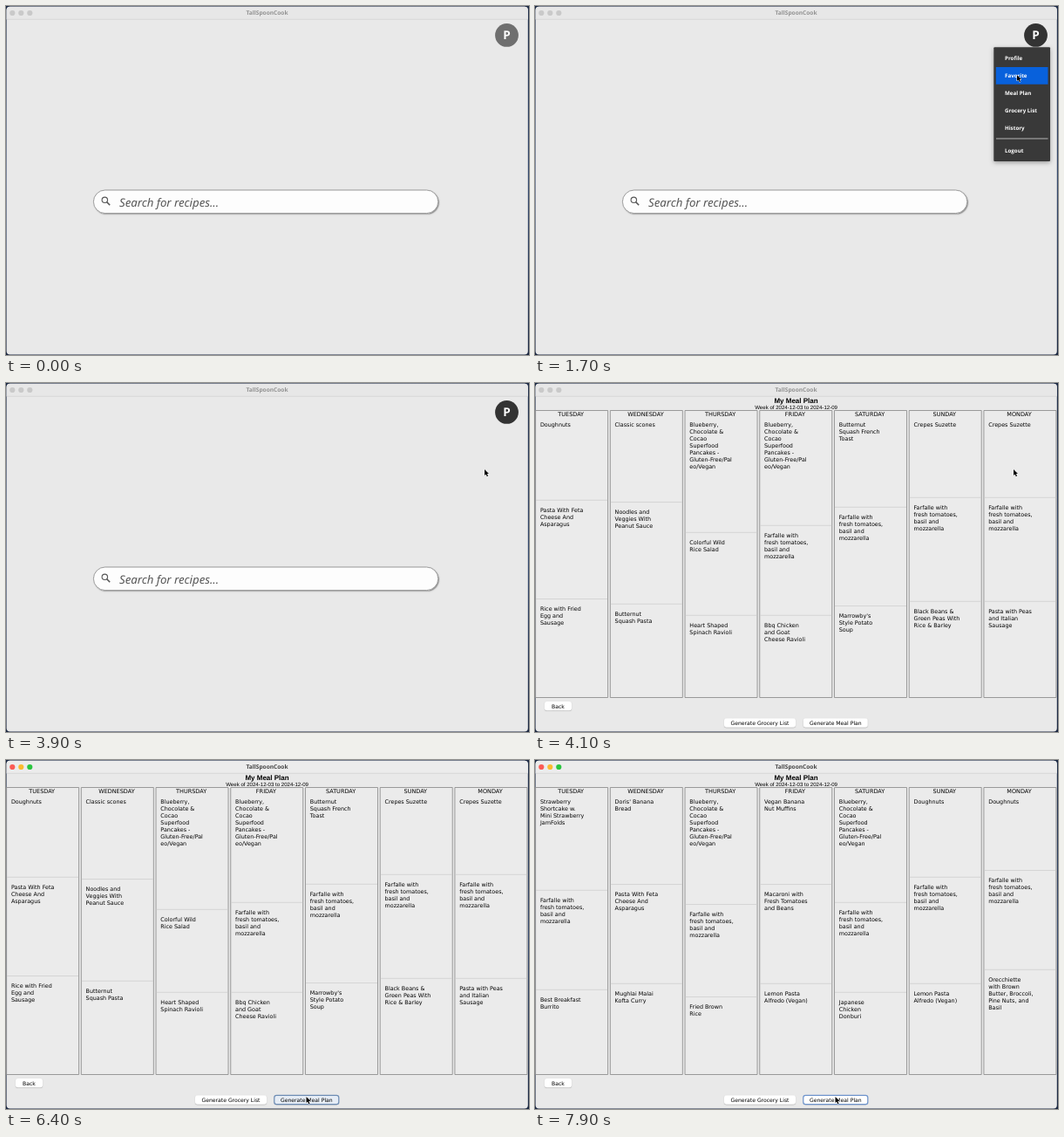
Animation of 600x400 px, one loop 8 s. Source, as an HTML page with a canvas:

```html
<!DOCTYPE html>
<html lang="en">
<head>
<meta charset="utf-8">
<title>Meal planner</title>
<style>
  html, body { margin: 0; width: 100%; height: 100%; overflow: hidden; background: #e9e9e9; }
  canvas { display: block; width: 600px; height: 400px; }
</style>
</head>
<body>
<canvas id="stage"></canvas>
<script>
const LOOP = 8000, STEP = 100;
const SANS = '"DejaVu Sans", sans-serif';
const BOLD = '"Open Sans", sans-serif';
const ARIAL = '"Liberation Sans", sans-serif';
const HUMAN = '"Noto Sans", sans-serif';

const canvas = document.getElementById('stage');
const ctx = canvas.getContext('2d');
const ratio = window.devicePixelRatio || 1;
canvas.width = 600 * ratio;
canvas.height = 400 * ratio;

// Moments at which the interface switches state
const HOVER = 400, MENU_OPEN = 600, MENU_CLOSE = 2800, PLAN = 4100;
const ACTIVE = 6300, RELEASE = 6600, NEW_PLAN = 7300;

// Pointer path: time, x, y
const path = [
  [100, 336, 388], [200, 515, 96], [300, 515, 96], [400, 562, 44], [600, 573, 35],
  [800, 573, 35], [1100, 558, 67], [1400, 556, 70], [1700, 553, 79],
  [1900, 551, 86], [2300, 549, 99], [4600, 549, 99],
  [5200, 419.5, 239.5], [5500, 362, 350], [5900, 344.5, 386], [LOOP, 344.5, 386]
];

const days = ['TUESDAY', 'WEDNESDAY', 'THURSDAY', 'FRIDAY', 'SATURDAY', 'SUNDAY', 'MONDAY'];
const pancakes = 'Blueberry,|Chocolate &|Cocao|Superfood|Pancakes -|Gluten-Free/Pal|eo/Vegan';
const farfalle = 'Farfalle with|fresh tomatoes,|basil and|mozzarella';
const feta = 'Pasta With Feta|Cheese And|Asparagus';
const alfredo = 'Lemon Pasta|Alfredo (Vegan)';

// Per day: breakfast, lunch, lunch y, dinner, dinner y
const firstPlan = [
  ['Doughnuts', feta, 145.5, 'Rice with Fried|Egg and|Sausage', 259],
  ['Classic scones', 'Noodles and|Veggies With|Peanut Sauce', 148, 'Butternut|Squash Pasta', 264.5],
  [pancakes, 'Colorful Wild|Rice Salad', 182.5, 'Heart Shaped|Spinach Ravioli', 277.5],
  [pancakes, farfalle, 174.5, 'Bbq Chicken|and Goat|Cheese Ravioli', 277.5],
  ['Butternut|Squash French|Toast', farfalle, 153.5, "Marrowby's|Style Potato|Soup", 267],
  ['Crepes Suzette', farfalle, 142.5, 'Black Beans &|Green Peas With|Rice & Barley', 261.5],
  ['Crepes Suzette', farfalle, 142.5, 'Pasta with Peas|and Italian|Sausage', 261.5]
];
const secondPlan = [
  ['Strawberry|Shortcake w.|Mini Strawberry|JamFolds', farfalle, 160.5, 'Best Breakfast|Burrito', 274.5],
  ["Doris' Banana|Bread", feta, 154, 'Mughlai Malai|Kofta Curry', 267.5],
  [pancakes, farfalle, 177, 'Fried Brown|Rice', 283],
  ['Vegan Banana|Nut Muffins', 'Macaroni with|Fresh Tomatoes|and Beans', 154, alfredo, 267.5],
  [pancakes, farfalle, 174.5, 'Japanese|Chicken|Donburi', 277.5],
  ['Doughnuts', farfalle, 145.5, alfredo, 267.5],
  ['Doughnuts', farfalle, 138, 'Orecchiette|with Brown|Butter, Broccoli,|Pine Nuts, and|Basil', 251.5]
];

function text(str, x, y, font, color = '#000', align = 'left') {
  ctx.font = font;
  ctx.fillStyle = color;
  ctx.textAlign = align;
  ctx.fillText(str, x, y);
}

function box(x, y, w, h, r, fill, stroke, line = 1) {
  ctx.beginPath();
  ctx.roundRect(x, y, w, h, r);
  if (fill) { ctx.fillStyle = fill; ctx.fill(); }
  if (stroke) { ctx.strokeStyle = stroke; ctx.lineWidth = line; ctx.stroke(); }
}

function rule(x1, x2, y, color, width = 0.7) {
  ctx.fillStyle = color;
  ctx.fillRect(x1, y - width / 2, x2 - x1, width);
}

function disc(x, y, r, fill) {
  ctx.beginPath();
  ctx.arc(x, y, r, 0, Math.PI * 2);
  ctx.fillStyle = fill;
  ctx.fill();
}

function withShadow(color, blur, dx, dy, draw) {
  ctx.save();
  ctx.shadowColor = color;
  ctx.shadowBlur = blur * ratio;
  ctx.shadowOffsetX = dx * ratio;
  ctx.shadowOffsetY = dy * ratio;
  draw();
  ctx.restore();
}

function pointerAt(t) {
  if (t < path[0][0]) return null;
  const i = path.findIndex(p => p[0] > t);
  const [t0, x0, y0] = path[i - 1], [t1, x1, y1] = path[i];
  const k = (t - t0) / (t1 - t0);
  return [x0 + (x1 - x0) * k, y0 + (y1 - y0) * k];
}

function drawPointer([x, y]) {
  ctx.save();
  ctx.translate(x, y);
  ctx.beginPath();
  [[0, 0], [0, 7], [1.6, 5.5], [2.8, 8.2], [4, 7.6], [2.9, 5.1], [5, 5]]
    .forEach(([px, py]) => ctx.lineTo(px, py));
  ctx.closePath();
  ctx.lineJoin = 'round';
  ctx.strokeStyle = '#fff';
  ctx.lineWidth = 1;
  ctx.stroke();
  ctx.fillStyle = '#000';
  ctx.fill();
  ctx.restore();
}

function drawWindow(active) {
  const desk = ctx.createLinearGradient(0, 0, 0, 400);
  desk.addColorStop(0, '#1d2b45');
  desk.addColorStop(0.5, '#34486b');
  desk.addColorStop(1, '#1b2740');
  ctx.fillStyle = desk;
  ctx.fillRect(0, 0, 600, 400);
  box(0.6, 0.8, 598.2, 398.6, 4, '#e9e9e9');
  box(0.6, 0.8, 598.2, 14.2, [4, 4, 0, 0], active ? '#ececec' : '#e7e7e7');
  rule(0.6, 598.8, 15.2, '#d3d3d3', 0.8);
  const lights = active ? ['#fb5b55', '#fbbb30', '#2bc640'] : ['#c9c9c9', '#c9c9c9', '#c9c9c9'];
  lights.forEach((c, i) => disc(7.3 + i * 10, 8, 3.1, c));
  text('TallSpoonCook', 299.5, 10.4, `700 6.6px ${BOLD}`, active ? '#444' : '#929292', 'center');
}

function drawSearch() {
  withShadow('rgba(0,0,0,.45)', 1.5, 1, 1, () => box(100.4, 211, 395.4, 26.6, 13.3, '#fff'));
  box(100.4, 211, 395.4, 26.6, 13.3, '#fdfdfd', '#858585', 0.8);
  ctx.beginPath();
  ctx.arc(113.3, 222.3, 3.2, 0, Math.PI * 2);
  ctx.strokeStyle = '#555';
  ctx.lineWidth = 1.1;
  ctx.stroke();
  ctx.beginPath();
  ctx.moveTo(115.6, 224.6);
  ctx.lineTo(119.2, 228.2);
  ctx.lineWidth = 1.5;
  ctx.stroke();
  text('Search for recipes...', 130, 230, `italic 13.2px ${HUMAN}`, '#555');
}

function drawAvatar(dark) {
  disc(574.5, 33.4, 13.4, dark ? '#333' : '#6f6f6f');
  text('P', 574.5, 38.2, `700 13.5px ${BOLD}`, '#fff', 'center');
}

function drawMenu(pointerY) {
  withShadow('rgba(0,0,0,.35)', 5, 0, 1.5, () => box(526.3, 47.3, 64.7, 130.7, 1, '#393939'));
  ['Profile', 'Favorite', 'Meal Plan', 'Grocery List', 'History', 'Logout'].forEach((item, i) => {
    const y = i < 5 ? 60 + i * 20 : 166;
    if (Math.abs(pointerY - y) < 10) box(528.8, y - 10, 59.7, 19.8, 0, '#0861dc');
    text(item, 539, y + 2.3, `700 6.2px ${BOLD}`, '#fff');
  });
  rule(529, 588.5, 152, '#c4c4c4', 0.9);
}

function drawMeal(meal, x, y) {
  meal.split('|').forEach((line, i) => text(line, x, y + 2.4 + i * 8, `6.4px ${SANS}`));
}

function drawButton(label, x, y, w, state) {
  const fill = state === 'pressed' ? '#e6edf6' : '#fff';
  withShadow('rgba(0,0,0,.3)', 1, 0, 0.5, () => box(x, y, w, 10.4, 2.6, fill));
  if (state) box(x, y, w, 10.4, 2.6, null, state === 'pressed' ? '#6e8db5' : '#6f95cd', 1.2);
  text(label, x + w / 2, y + 7.5, `6.1px ${SANS}`, '#000', 'center');
}

function drawPlan(t) {
  text('My Meal Plan', 299.5, 22.7, `700 8px ${ARIAL}`, '#000', 'center');
  text('Week of 2024-12-03 to 2024-12-09', 299.6, 30, `6.1px ${ARIAL}`, '#000', 'center');
  const plan = t < NEW_PLAN ? firstPlan : secondPlan;
  plan.forEach(([breakfast, lunch, lunchY, dinner, dinnerY], i) => {
    const left = 0.6 + i * 85.72, x = left + 5.3;
    box(left, 31.5, 83, 329, 0, '#ebebeb', '#858585', 0.8);
    text(days[i], left + 40.6, 38.4, `6.5px ${SANS}`, '#000', 'center');
    drawMeal(breakfast, x, 47.6);
    [[lunch, lunchY], [dinner, dinnerY]].forEach(([meal, y]) => {
      rule(left + 0.5, left + 82.5, y - 11.3, '#cacaca');
      drawMeal(meal, x, y);
    });
  });
  drawButton('Back', 11, 365, 31, '');
  drawButton('Generate Grocery List', 217, 384.3, 82, '');
  const state = t < ACTIVE ? '' : t < RELEASE ? 'pressed' : 'focused';
  drawButton('Generate Meal Plan', 307.8, 384.3, 74, state);
}

function draw(t) {
  ctx.setTransform(ratio, 0, 0, ratio, 0, 0);
  ctx.textBaseline = 'alphabetic';
  ctx.textRendering = 'geometricPrecision';
  const pointer = pointerAt(t);
  drawWindow(t >= ACTIVE);
  if (t < PLAN) {
    drawSearch();
    drawAvatar(t >= HOVER);
    if (t >= MENU_OPEN && t < MENU_CLOSE) drawMenu(pointer[1]);
  } else {
    drawPlan(t);
  }
  if (pointer) drawPointer(pointer);
}

const start = performance.now();
function tick() {
  const t = (performance.now() - start) % LOOP;
  draw(Math.floor(t / STEP) * STEP);
  requestAnimationFrame(tick);
}
tick();
</script>
</body>
</html>
```
